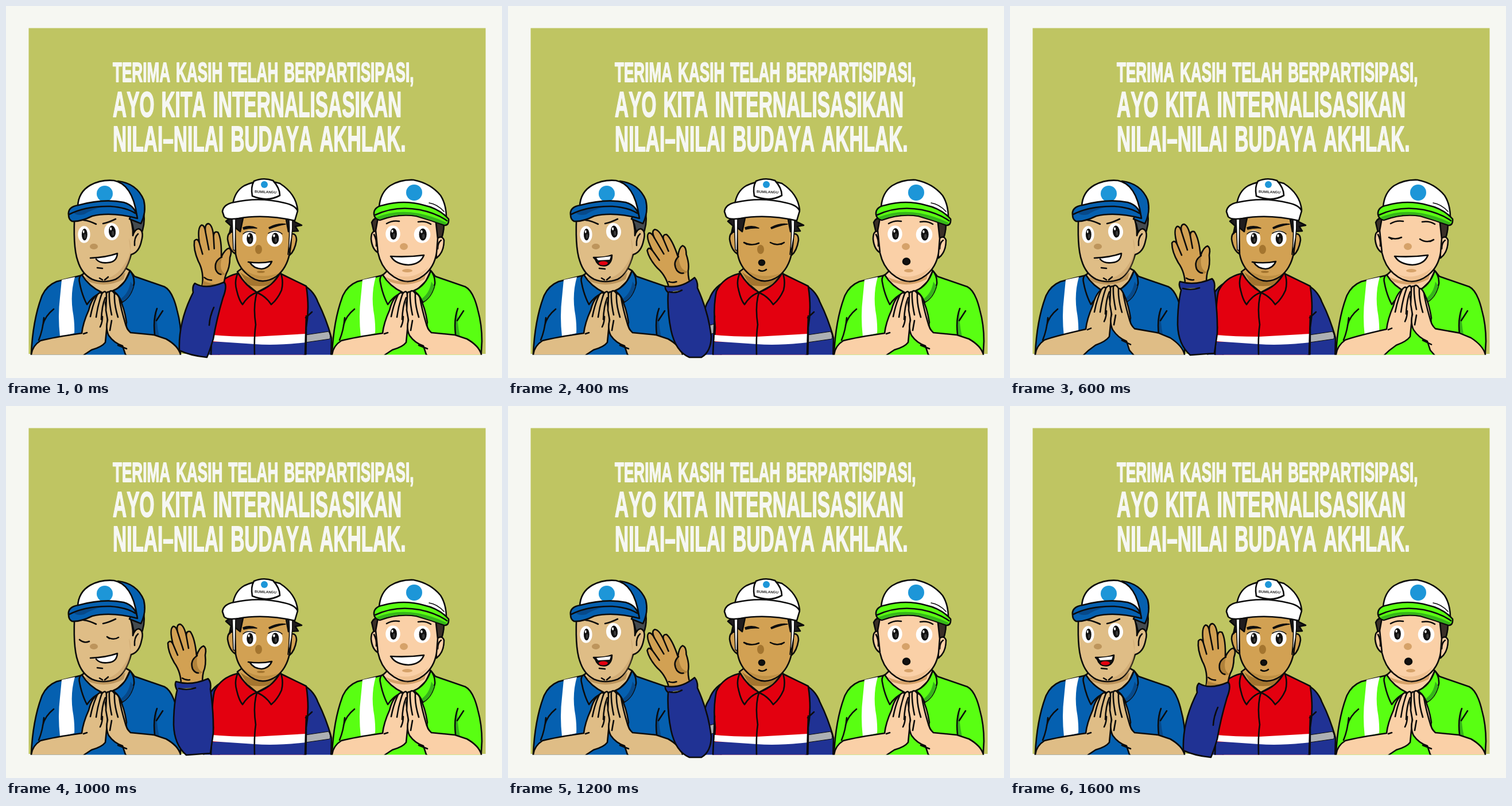
Recreate the animation shown at these times as an HTML page. Size 864 by 648 pixels, loop 1800 ms.

```html
<!DOCTYPE html>
<html lang="id">
<head>
<meta charset="utf-8">
<title>Terima kasih</title>
<style>
html, body { margin: 0; width: 100%; height: 100%; overflow: hidden; background: #f6f7f2; }
svg { display: block; width: 864px; height: 648px; stroke-linecap: round; stroke-linejoin: round; --lift: 0deg; }
svg.raised { --lift: 4.5deg; }
text { font-family: "Liberation Sans", Arial, sans-serif; font-weight: 700; }
.lettering { fill: #f6f7f2; stroke: #f6f7f2; stroke-width: 2; font-kerning: none; word-spacing: .32em; }
.person { clip-path: url(#floor); }
.forearm-left { transform-origin: 44px 605px; transform: skewY(calc(-1 * var(--lift))); }
.forearm-right { transform-origin: 304px 605px; transform: skewY(var(--lift)); }
.ink { stroke: #0b0b0b; stroke-width: 2.6; }
.line { fill: none; }
.bare { stroke: none; }
.skin { fill: var(--skin); }
.tan { fill: var(--tan); }
.shirt { fill: var(--shirt); }
.deep { fill: var(--deep); }
.white { fill: #fff; }
.navy { fill: #203294; }
.red { fill: #e3000f; }
.logo { fill: #1d96d8; stroke: none; }
#left { --skin: #dfbd86; --tan: #bd955c; --shirt: #0560b0; --deep: #07498a; }
#mid { --skin: #d2a153; --tan: #a4752f; }
#arm { --skin: #d2a153; --tan: #b0823b; }
#right { --skin: #fad0a7; --tan: #d6a269; --shirt: #59ff12; --deep: #36b51a; }
.talk .smile, .person:not(.talk) .speech,
.shut .open, .person:not(.shut) .closed { display: none; }
</style>
</head>
<body>
<svg viewBox="0 0 864 648">
  <defs>
    <clipPath id="floor"><rect width="864" height="607.5"/></clipPath>

    <g id="eye">
      <ellipse class="white bare" rx="13" ry="15"/>
      <ellipse class="bare" cx="1" rx="6" ry="10.5" fill="#111"/>
      <ellipse class="bare" cx="2" cy="3" rx="2" ry="4" fill="#3a3a3a"/>
      <ellipse class="white bare" cx="-1" cy="-5" rx="1.6" ry="2.6"/>
    </g>

    <g id="torso">
      <path class="shirt" d="M44 620V605Q47 545 63 504Q71 487 88 480L132 469L217 462L224 471L276 489Q290 496 298 530Q305 555 305 584L303 620Z"/>
      <path class="white bare" d="M97 477L120 472Q112 500 116 530Q120 552 119 570L94 576Q90 540 94 508Z"/>
      <path class="deep bare" d="M263 527Q256 545 259 572L267 576Q261 550 263 527Z"/>
      <path class="line" d="M83 528Q68 540 64 556M263 527Q256 545 259 572M66 543Q64 565 57 582M273 531L262 548"/>
      <path class="skin" d="M132 469L141 484L168 502L189 497L207 480L216 461L200 452H150Z"/>
      <path class="tan bare" d="M137 472Q175 490 208 464L205 476Q174 492 144 480Z"/>
      <path class="shirt" d="M132 468Q126 472 128 481Q132 503 141 520Q151 505 167 499Q144 488 132 468ZM216 461Q224 471 223 484Q218 507 202 516Q195 501 186 496Q207 488 216 461Z"/>
      <path class="deep bare" d="M222 488Q216 509 203 515L200 510Q214 500 217 480Z"/>
      <g class="forearm-left">
        <path class="skin" d="M44 620V607Q46 592 60 583Q83 577 132 570Q134 552 144 530Q149 510 159 503Q164 497 167 501Q173 494 175 501Q177 510 173 517L177 545L173 586Q167 594 149 599L137 607L122 620Z"/>
        <path class="line" d="M159 503Q151 520 147 541M167 501Q160 520 157 542M173 508Q167 522 166 546M135 571L141 569M164 559Q168 551 168 541"/>
      </g>
      <g class="forearm-right">
        <path class="skin" d="M304 620V607Q300 592 279 580L258 573L217 569Q207 560 210 551Q206 525 197 508Q193 500 189 501Q184 493 180 498Q174 497 175 505L174 530L177 547Q173 562 179 574Q188 587 203 592L208 607L220 620Z"/>
        <path class="line" d="M180 498Q179 514 184 538M189 502Q188 519 195 542M197 508Q200 527 209 557M184 548L181 565M195 591L210 597"/>
      </g>
    </g>
  </defs>

  <rect x="39.5" y="38.5" width="796" height="567.5" fill="#bfc562"/>

  <g class="lettering" transform="translate(186 0) scale(.535 1)">
    <text y="132" font-size="48.8">TERIMA KASIH TELAH BERPARTISIPASI,</text>
    <text y="193" font-size="62.5">AYO KITA INTERNALISASIKAN</text>
    <text y="253" font-size="62.5">NILAI–NILAI BUDAYA AKHLAK.</text>
  </g>

  <g id="left" class="person ink">
    <use href="#torso"/>
    <path fill="#454b50" d="M210 360L240 360Q243 382 234 401L224 397L220 380Z"/>
    <path class="skin" d="M120 355Q116 419 125 444Q132 467 150 476Q169 484 191 476Q209 466 218 433Q232 429 236 409Q241 391 231 388Q224 389 221 400Q222 382 212 355Z"/>
    <path class="tan bare" opacity=".4" d="M214 404Q224 428 202 456Q189 473 165 478Q192 481 207 461Q218 443 217 430Z"/>
    <path class="line" d="M230 397Q223 403 224 417M163 474L168 477M178 472L172 477"/>
    <path class="shirt" d="M195 305Q228 309 240 338Q245 359 235 379L215 371Q230 341 195 305Z"/>
    <path class="white" d="M125 349Q126 324 147 312Q166 302 188 304Q220 310 228 365Q175 341 125 352Z"/>
    <circle class="logo" cx="172" cy="327" r="14"/>
    <path class="shirt" d="M109 364Q107 350 126 347Q170 335 205 342Q226 348 229 370Q183 358 150 366Q130 376 115 375Q109 372 109 364Z"/>
    <path class="deep bare" d="M118 360Q140 348 172 349Q150 354 136 363Q123 366 118 360Z"/>
    <path class="line" d="M110 363Q139 348 182 349Q210 351 225 361"/>
    <path class="line" d="M135 373Q145 374 157 380M169 379Q179 377 191 371"/>
    <ellipse class="tan bare" cx="153" cy="419" rx="7" ry="5"/>
    <g class="open">
      <use href="#eye" transform="translate(136 398) scale(.82 .98)"/>
      <use href="#eye" transform="translate(184 393) rotate(-5)"/>
    </g>
    <path class="closed line" d="M128 407Q136 414 145 410M176 402Q187 409 196 403M176 402L180 405"/>
    <g class="smile">
      <path class="white" d="M147 439Q174 438 194 431Q193 446 178 447Q164 449 157 441"/>
      <path class="line" d="M159 456L168 457"/>
    </g>
    <g class="speech">
      <path fill="#111" d="M149 438Q169 439 181 434Q181 448 171 452Q157 455 152 441Z"/>
      <path class="white bare" d="M154 439L179 436L177 442L157 443Z"/>
      <ellipse cx="166" cy="448" rx="8" ry="3.5" class="red bare"/>
      <path class="line" d="M159 457L169 458"/>
    </g>
  </g>

  <g id="mid" class="person ink">
    <path class="navy" d="M385 477Q359 487 351 510Q337 531 341 562L345 620H370ZM505 480Q534 490 543 515Q558 545 567 578L566 620H520Z"/>
    <path fill="#adb0b3" stroke-width="1" d="M348 557L363 553V569L350 572ZM522 573L562 567Q566 575 564 580L522 586Z"/>
    <path class="red" d="M403 466Q374 473 363 497Q357 525 361 560L357 620H522Q523 584 523 560Q529 526 523 488L478 466Z"/>
    <path class="navy bare" d="M358 585L522 586V608H356Z"/>
    <path class="white bare" d="M360 573Q390 576 434 576L523 571V586Q470 592 433 589L359 584Z"/>
    <path class="line" d="M360 540L357 607M523 540L521 607M437 500Q430 522 435 555Q432 575 433 607M522 543L533 533"/>
    <path class="skin" d="M403 463L414 480L437 499L461 486L477 465L455 450H420Z"/>
    <path class="tan bare" d="M408 464Q444 491 480 461L460 486Q442 490 421 486Z"/>
    <path class="red" d="M404 465Q397 480 402 496Q406 513 412 520Q422 504 437 499Q417 487 404 465ZM478 464Q484 478 480 495Q473 511 462 520Q453 506 437 499Q466 488 478 464Z"/>
    <path class="skin" d="M399 394Q386 391 386 406Q389 426 400 432ZM496 397Q506 395 506 408Q503 427 494 434Z"/>
    <path class="skin" d="M398 355L400 432Q404 454 420 467Q444 489 471 471Q489 457 494 431Q499 404 497 355Z"/>
    <path class="tan bare" opacity=".4" d="M403 448Q431 481 477 465Q448 486 421 467Z"/>
    <path fill="#201d1f" d="M383 375Q394 365 413 369L408 393L398 385L389 397L392 383ZM487 366L505 377L515 382L504 384L509 392L492 393Z"/>
    <path class="white" stroke-width="1.6" d="M394 370H400L399 426L396 425ZM493 372H499Q500 404 491 433Q495 400 493 372Z"/>
    <path class="white" d="M395 346Q398 323 415 313Q444 299 477 309Q505 327 508 355L500 365Z"/>
    <path class="white" d="M377 358Q379 345 397 342Q441 332 485 343Q504 347 508 357L503 374Q450 362 405 370Q385 373 380 367Z"/>
    <path class="white" d="M432 305Q448 298 465 304Q477 317 477 330Q456 342 429 331Q426 315 432 305Z"/>
    <circle class="logo" cx="450" cy="311" r="6"/>
    <text class="bare" x="452" y="326" font-size="6.2" text-anchor="middle" fill="#222" transform="rotate(2 452 326)">BUMILANGU</text>
    <path fill="#111" stroke-width="1.5" d="M413 386Q425 381 437 387Q426 386 414 389ZM458 386Q472 378 487 380Q474 382 459 388Z"/>
    <ellipse class="tan bare" cx="440" cy="424" rx="6" ry="8"/>
    <g class="open">
      <use href="#eye" transform="translate(424 405) scale(.94)"/>
      <use href="#eye" transform="translate(468 405) scale(1.05 .95)"/>
      <path class="line" stroke-width="1.5" d="M413 397Q422 389 434 396M457 396Q470 388 481 397"/>
    </g>
    <path class="closed line" d="M411 412Q424 419 437 413M457 412Q469 419 481 412M411 412L416 415M481 412L476 415"/>
    <g class="smile">
      <path class="white" d="M422 446Q444 449 463 445Q458 457 445 458Q431 457 425 447"/>
      <ellipse class="tan bare" cx="444" cy="463" rx="7" ry="2"/>
    </g>
    <g class="speech">
      <ellipse cx="442" cy="447" rx="5" ry="4.5" fill="#111"/>
      <path class="line" d="M437 460Q444 464 450 459"/>
    </g>
  </g>

  <g id="arm" class="ink">
    <g id="hand">
      <path class="skin" d="M-20 5Q-19 -20 -32 -38Q-43 -57 -43 -72Q-39 -79 -34 -70Q-41 -96 -34 -101Q-29 -102 -26 -91Q-29 -104 -22 -105Q-15 -103 -11 -85Q-11 -94 -4 -92Q4 -81 7 -50Q12 -65 19 -67Q25 -64 22 -51Q24 -33 19 -22Q16 -10 18 5Z"/>
      <path class="tan bare" d="M8 -48Q-4 -42 0 -25Q6 -14 18 -21Q5 -26 8 -48ZM-19 -5Q2 2 18 -6V5H-20Z"/>
      <path class="line" d="M-34 -70L-26 -51M-26 -91L-16 -60M-11 -85L-7 -63M8 -50Q-5 -42 0 -27Q4 -20 10 -20M-18 -11Q-12 -7 -5 -8"/>
    </g>
    <path id="sleeve" class="navy"/>
  </g>

  <g id="right" class="person ink">
    <use href="#torso" transform="translate(524 0)"/>
    <path fill="#3b3028" d="M637 377Q641 367 655 369L648 402L641 394ZM738 364L763 378Q763 397 756 411L743 402Z"/>
    <path class="skin" d="M647 393Q636 389 636 406Q638 425 649 430ZM748 408Q759 397 763 408Q763 429 750 439Z"/>
    <path class="skin" d="M650 358L644 391L648 430Q653 453 668 466Q698 492 728 469Q746 455 750 430L752 405L747 360Z"/>
    <path class="tan bare" opacity=".35" d="M664 462Q701 484 736 455Q721 478 697 480Z"/>
    <path class="line" d="M641 398Q646 407 645 418M758 408Q752 412 752 423"/>
    <path class="white" d="M650 350Q652 325 669 313Q687 302 710 303Q740 309 757 330Q768 347 767 374Q700 341 650 352Z"/>
    <path class="line" stroke-width="1.5" d="M737 343Q751 345 763 358"/>
    <circle class="logo" cx="711" cy="325" r="14"/>
    <path class="shirt" d="M641 363Q640 350 657 347Q693 337 728 347Q755 353 771 371Q772 382 764 382Q740 373 715 366Q684 361 651 373Q642 371 641 363Z"/>
    <path class="deep bare" d="M645 368Q679 354 718 361Q748 367 768 378L764 381Q737 372 715 365Q681 360 651 372Z"/>
    <path class="line" d="M643 364Q679 347 721 355Q750 361 768 374"/>
    <path class="line" d="M663 379Q673 373 685 375M718 376Q731 374 740 380"/>
    <ellipse class="tan bare" cx="693" cy="419" rx="7" ry="6"/>
    <g class="open">
      <use href="#eye" transform="translate(674 397) scale(.98 .96)"/>
      <use href="#eye" transform="translate(725 398) scale(1.1 1)"/>
    </g>
    <path class="closed line" d="M660 403Q671 408 682 403M714 406Q726 414 738 407M660 403L665 406M738 407L732 410"/>
    <g class="smile">
      <path class="white" d="M670 436Q699 438 728 434Q722 450 701 451Q679 450 671 437"/>
      <ellipse class="tan bare" cx="699" cy="461" rx="9" ry="3"/>
    </g>
    <g class="speech">
      <ellipse cx="694" cy="445" rx="6" ry="5.5" fill="#111"/>
      <ellipse class="tan bare" cx="698" cy="461" rx="8" ry="3"/>
    </g>
  </g>
</svg>
<script>
const STEP = 200, LOOP = 1800;
const stage = document.querySelector('svg');
const people = document.querySelectorAll('.person');
const hand = document.getElementById('hand');
const sleeve = document.getElementById('sleeve');

const near = {
  hand: 'translate(362 486) rotate(7)',
  sleeve: 'M329 483Q348 495 380 481Q386 487 378 508Q367 545 361 580Q355 600 350 612Q321 609 302 600Q300 550 326 499Q324 488 329 483ZM362 525Q355 540 354 556'
};
const middle = {
  hand: 'translate(325 485)',
  sleeve: 'M296 480Q322 488 352 475Q358 481 356 493Q362 535 361 570L356 605L314 608Q293 590 292 555Q292 520 298 495Q293 486 296 480ZM301 492Q316 496 330 491'
};
const far = {
  hand: 'translate(300 487) rotate(-12.5)',
  sleeve: 'M274 488Q301 493 325 473Q331 480 330 491Q349 533 354 575Q354 602 337 612L316 612Q292 602 284 565Q277 530 279 499Q273 494 274 488ZM281 498Q292 501 303 495'
};
const wave = [near, middle, far, middle];

function draw(now) {
  const beat = Math.floor(now % LOOP / STEP);
  const phase = beat % 4;
  const talking = beat > 0 && phase % 2 === 0;
  // the folded hands bob only in the first half of the loop
  stage.classList.toggle('raised', beat < 4 && beat % 2 === 1);
  people.forEach((person, i) => {
    person.classList.toggle('talk', talking);
    person.classList.toggle('shut', phase === i + 1); // they blink in turn
  });
  hand.setAttribute('transform', wave[phase].hand);
  sleeve.setAttribute('d', wave[phase].sleeve);
  requestAnimationFrame(draw);
}
draw(performance.now());
</script>
</body>
</html>
```
